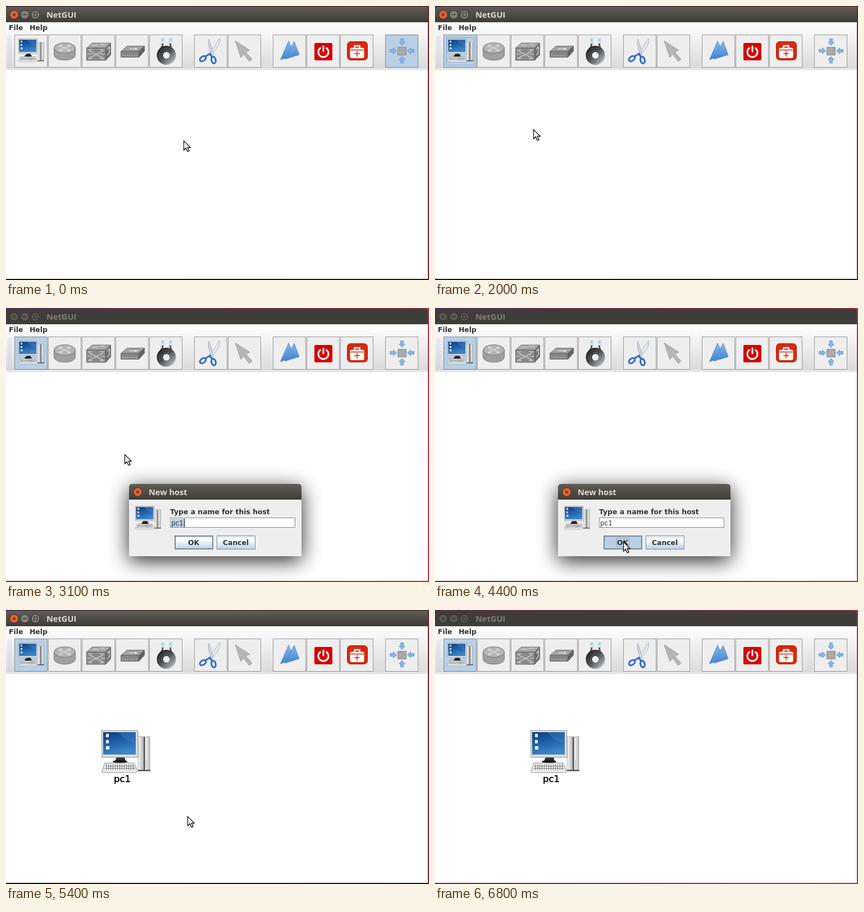
An HTML page for the animation above (7.1 s loop, 753 by 489 pixels).

```html
<!DOCTYPE html>
<html lang="en">
<head>
<meta charset="utf-8">
<title>NetGUI</title>
<style>
html, body { margin: 0; width: 100%; height: 100%; overflow: hidden; }
svg { display: block; width: 753px; height: 489px; }
text { font: bold 12.4px "DejaVu Sans", sans-serif; fill: #333; }
.title { font: bold 14.6px "Open Sans", "Noto Sans", sans-serif; fill: #dfdbd2; }
.plain { font-weight: normal; font-size: 12px; }
.label { font-weight: normal; font-size: 16.5px; fill: #000; stroke: #000; stroke-width: .5; }
.off .title { fill: #807d78; }
.off .bar { fill: #3e3d39; }
.off .ctl { fill: #5a5852; stroke: #33322e; }
.off .glyph { stroke: #33322e; }
.ctl { fill: #85827a; stroke: #33322e; }
.close { fill: #ea6237; stroke: #6d2a15; }
.glyph { fill: none; stroke: #3a3833; stroke-width: 1.3; }
</style>
</head>
<body>
<svg viewBox="0 0 753 489">
<defs>
  <linearGradient id="wall"><stop stop-color="#6d2158"/><stop offset="1" stop-color="#b62f42"/></linearGradient>
  <linearGradient id="bar" x2="0" y2="1"><stop stop-color="#5f5d54"/><stop offset="1" stop-color="#3d3c37"/></linearGradient>
  <linearGradient id="tools" x2="0" y2="1"><stop stop-color="#fff"/><stop offset="1" stop-color="#dadada"/></linearGradient>
  <linearGradient id="metal" x2="0" y2="1"><stop stop-color="#dde8f3"/><stop offset=".3" stop-color="#fff"/><stop offset="1" stop-color="#b8cfe5"/></linearGradient>
  <linearGradient id="screen" x2=".35" y2="1"><stop stop-color="#0d3d7c"/><stop offset=".5" stop-color="#1d5ea6"/><stop offset="1" stop-color="#3c86c8"/></linearGradient>
  <linearGradient id="silver"><stop stop-color="#fafafa"/><stop offset="1" stop-color="#bdbdbd"/></linearGradient>
  <linearGradient id="coil" x2="1" y2="1"><stop stop-color="#222"/><stop offset=".45" stop-color="#45484b"/><stop offset="1" stop-color="#b4b8bb"/></linearGradient>
  <linearGradient id="plane" x2="0" y2="1"><stop stop-color="#8ab9ec"/><stop offset="1" stop-color="#3f82cf"/></linearGradient>
  <pattern id="grip" width="4" height="4" patternUnits="userSpaceOnUse">
    <path d="M0 .5h1M2 2.5h1" stroke="#fff"/><path d="M1 1.5h1M3 3.5h1" stroke="#7a9cc6"/>
  </pattern>
  <pattern id="keys" width="4" height="4" patternUnits="userSpaceOnUse">
    <path d="M0 0h4M0 0v4" stroke="#777" stroke-width="1.800"/>
  </pattern>
  <filter id="blur" x="-40%" y="-80%" width="180%" height="260%"><feGaussianBlur stdDeviation="18"/></filter>
  <filter id="soft" x="-50%" y="-50%" width="200%" height="200%"><feGaussianBlur stdDeviation="1"/></filter>

  <g id="pc">
    <path d="M65 12h9v60h-9z" fill="url(#silver)" stroke="#999" stroke-width=".7"/>
    <path d="M78 12h8v59h-8z" fill="url(#silver)" stroke="#888" stroke-width=".7"/>
    <path d="M76 12v60M65 72.500h22" stroke="#3a3a3a" stroke-width="2"/>
    <path d="M80 54v14" stroke="#bbb"/>
    <path d="M27 48h14l2 8H24z" fill="#333"/>
    <ellipse cx="33" cy="56.500" rx="13" ry="2.500" fill="#111"/>
    <path d="M.5 1h64l1 48H1z" fill="#dedede" stroke="#8a8a8a"/>
    <path d="M3 4h58v40H3z" fill="url(#screen)"/>
    <path d="M30 4h31v20Q44 22 30 4z" fill="#5aa0dc" opacity=".25"/>
    <path d="M8 7h5v6H8zM8 18h5v6H8zM8 29h6v6H8z" fill="#eef4fa"/>
    <path d="M6 59h52l6 14q0 3-3 3H3q-3 0-2-3z" fill="#efefef" stroke="#888"/>
    <path d="M8 61h49l4 11H4z" fill="url(#keys)"/>
  </g>
  <path id="pull" d="M-2.500-6h5v6H5.500L0 6-5.500 0h3z" fill="#86b5e8" stroke="#5f95d0" stroke-width=".8"/>
  <g id="cross"><path class="glyph" d="M-2.500-2.500l5 5m0-5l-5 5"/></g>
</defs>

<rect width="753" height="489" fill="url(#wall)"/>
<g id="shade" fill="#000"><path d="M0 0h753v1H0z" opacity=".6"/><path d="M751 0h2v489h-2z" opacity=".35"/><path d="M0 487h751v2H0z" opacity=".7"/></g>
<path d="M0 29h751v458H0z" fill="#fff"/>

<g id="win">
  <path class="bar" d="M0 29V7q0-6 6-6h739q6 0 6 6v22z" fill="url(#bar)"/>
  <circle class="ctl close" cx="14.500" cy="15.500" r="7.500" id="shut"/>
  <circle class="ctl" cx="33.500" cy="15.500" r="7.500"/>
  <circle class="ctl" cx="52.500" cy="15.500" r="7.500"/>
  <use href="#cross" x="14.500" y="15.500"/>
  <path class="glyph" d="M30 15.500h7M49.500 12.500h6v6h-6z"/>
  <text class="title" x="72" y="21">NetGUI</text>
</g>

<path d="M0 29h751v83H0z" fill="url(#tools)"/>
<path d="M0 113.500h751" stroke="#ccc"/>
<text x="5" y="43">File</text><text x="42" y="43">Help</text>
<path d="M2 52h9v58H2z" fill="url(#grip)"/>
<g id="buttons"></g>
<rect id="ring" x="20.500" y="56.500" width="49" height="49" fill="none" stroke="#8fa9c6"/>

<use href="#pc" transform="translate(22 58) scale(.527 .55)"/>

<g stroke="#666" stroke-width=".8">
  <path d="M85.500 75v12c0 13 38 13 38 0V75z" fill="#a0a0a0"/>
  <ellipse cx="104.500" cy="75" rx="19" ry="9.500" fill="#b4b4b4"/>
</g>
<path d="M96 71l17 8m0-8l-17 8M95 73v-3h5M114 73v-3h-5M100 80h-5v-3M109 80h5v-3" fill="none" stroke="#e8e8e8" stroke-width="1.200"/>

<g stroke="#5c5c5c" stroke-width=".8">
  <path d="M143.500 75l10-9h33l-9 9z" fill="#aaa"/>
  <path d="M143.500 75h34v22h-34z" fill="#8a8a8a"/>
  <path d="M177.500 75l9-9v21l-9 10z" fill="#707070"/>
</g>
<path d="M148 80l25 13m0-13l-25 13M145 86h8m15 0h8M146 78h8m13 0h8M146 94h8m13 0h8M154 70h10m3-2h10M180 77l4-4v10l-4 5" fill="none" stroke="#e4e4e4" stroke-width="1.200"/>

<g stroke="#5c5c5c" stroke-width=".8">
  <path d="M204.500 81l11-9.500h31l-10 9.500z" fill="#a2a2a2"/>
  <path d="M204.500 81h32v10.500h-32z" fill="#868686"/>
  <path d="M236.500 81l10-9.500v9l-10 11z" fill="#626262"/>
</g>
<path d="M219 76.500h14m-3-1.500l3 1.500-3 1.500" fill="none" stroke="#f4f4f4" stroke-width="1.200"/>
<path d="M207 88.500h27" stroke="#bbb" stroke-width="1.500" stroke-dasharray="2 2"/>

<g fill="none">
  <path d="M279 66q0 6-4 11M292.500 66q0 7 3 11" stroke="#555" stroke-width="3"/>
  <circle cx="285.500" cy="88" r="11.500" stroke="url(#coil)" stroke-width="11"/>
  <circle cx="285.500" cy="88" r="9" stroke="#888" stroke-width=".7"/>
  <circle cx="285.500" cy="88" r="13" stroke="#777" stroke-width=".7"/>
  <path d="M276.500 57.500h5v9h-5zM290.500 57.500h5v9h-5z" fill="#e6f5f7" stroke="#a9cdd4" stroke-width=".8"/>
  <path d="M279 59v4M293 59v4" stroke="#46b6c8" stroke-width="1.500"/>
</g>

<path d="M380 58q3 7-5 18l-11 13-3-2z" fill="#e3e8ee" stroke="#95a0ad" stroke-width=".7"/>
<path d="M361 59q-2 9 1 17l4 13 3-2-3-13z" fill="#cfd6df" stroke="#95a0ad" stroke-width=".7"/>
<g fill="none" stroke="#2b6bd0" stroke-width="3">
  <ellipse cx="350.500" cy="94" rx="6" ry="3.800" transform="rotate(-35 350.500 94)"/>
  <ellipse cx="369.500" cy="96.500" rx="3.800" ry="6" transform="rotate(-15 369.500 96.500)"/>
  <path d="M355 90l8-5 4 7"/>
</g>

<path d="M408 62l26 17-7 3 11 13-5 4-10-13-5 6z" fill="#b5b5b5" stroke="#a2a2a2"/>

<g fill="url(#plane)" stroke="#4c88cc" stroke-width=".8"><path d="M503 62.500L488.500 96l25-10z"/><path d="M513 63l9 24-26 8z"/></g>

<rect x="549" y="66" width="32" height="31" rx="2" fill="#d50000"/>
<path d="M559.500 75a9 9 0 1 0 11 0M565 72v9" fill="none" stroke="#fff" stroke-width="3" stroke-linecap="round"/>

<rect x="607.500" y="63.500" width="36" height="33" rx="6" fill="#d9290d" stroke="#b01c06"/>
<path d="M620.500 75v-4h9v4" fill="none" stroke="#fff" stroke-width="2.500"/>
<rect x="612.500" y="74.500" width="25" height="18.500" rx="3" fill="#fff"/>
<path d="M613 78.500h24M625 80v10M620 85h10" stroke="#d9290d" stroke-width="1.500"/>

<path d="M697.500 73.500h15v14h-15z" fill="#aaa" stroke="#8b8b8b"/>
<use href="#pull" transform="translate(705 64.500)"/>
<use href="#pull" transform="translate(705 96) rotate(180)"/>
<use href="#pull" transform="translate(689.500 80) rotate(-90)"/>
<use href="#pull" transform="translate(720.500 80) rotate(90)"/>

<g id="node">
  <use href="#pc" x="170" y="214"/>
  <text class="label" x="192" y="307">pc1</text>
</g>

<g id="dialog">
  <rect x="219" y="322" width="307" height="129" filter="url(#blur)" opacity=".85"/>
  <path d="M219 342h307v101H219z" fill="#eee"/>
  <path d="M219 342v-22q0-6 6-6h295q6 0 6 6v22z" fill="url(#bar)"/>
  <circle class="ctl close" cx="234.500" cy="328.500" r="7.500"/>
  <use href="#cross" x="234.500" y="328.500"/>
  <text class="title" x="254" y="334">New host</text>
  <use href="#pc" transform="translate(230 353) scale(.527 .55)"/>
  <text x="292" y="368">Type a name for this host</text>
  <path d="M292.500 374.500h222v17h-222z" fill="#fff" stroke="#7a8a99"/>
  <g id="select"><path d="M294 376h23v15h-23z" fill="#b8cfe5"/><path d="M317.500 376v15" stroke="#000"/></g>
  <text class="plain" x="294" y="388">pc1</text>
  <rect id="ok" x="301" y="407" width="67" height="23" stroke="#7a8a99" stroke-width="2"/>
  <rect id="okRing" x="323.500" y="410.500" width="22" height="16" fill="none" stroke="#8fa9c6"/>
  <rect x="375.500" y="406.500" width="68" height="24" fill="url(#metal)" stroke="#7a8a99"/>
  <text x="324" y="423">OK</text><text x="386" y="423">Cancel</text>
</g>

<g id="cursor">
  <path d="M1.500 2v16l4-3.500 3 6.500 3-1.500-3-6h5z" opacity=".3" filter="url(#soft)"/>
  <path d="M.5.7v16.300l3.800-3.600 2.700 6.300 2.800-1.200-2.700-6.100h5z" fill="#fff" stroke="#000" stroke-width="1.200"/>
</g>
</svg>
<script>
const $ = id => document.getElementById(id);
const set = (el, name, value) => el.setAttribute(name, value);
const show = (id, on) => set($(id), 'opacity', +on);

const buttons = [15, 75, 135, 195, 255, 335, 395, 475, 535, 595, 675].map(x => {
  const r = document.createElementNS('http://www.w3.org/2000/svg', 'rect');
  for (const [k, v] of Object.entries({ x: x + .5, y: 51.5, width: 58, height: 58 })) set(r, k, v);
  return $('buttons').appendChild(r);
});
const paint = (b, fill) => {
  set(b, 'fill', fill);
  set(b, 'stroke', fill === '#b8cfe5' ? '#7a8a99' : '#999');
};

const smooth = u => u * u * (3 - 2 * u);
const out = u => 1 - (1 - u) ** 1.84;
// start, step count, from, to, easing for x and y
const moves = [
  [300, 7, [316, 240], [52, 77], smooth, smooth],
  [1600, 9, [52, 77], [211, 261], out, out],
  [3600, 7, [211, 261], [335, 417], smooth, smooth],
  [5400, 7, [335, 417], [108, 0], u => u ** 1.5, u => u ** 1.1]
];

function pointer(t) {
  const [start, n, from, to, ...ease] = moves.findLast(m => t >= m[0]) || moves[0];
  const u = Math.min(1, Math.max(0, (t - start + 100) / (100 * n)));
  return from.map((a, i) => Math.round(a + (to[i] - a) * ease[i](u)));
}

function draw(now) {
  const t = Math.floor(now % 7100 / 100) * 100;
  const [x, y] = pointer(t);
  set($('cursor'), 'transform', `translate(${x} ${y})`);
  show('cursor', t < 6100);

  const hover = x >= 15 && x < 75 && y >= 51 && y < 111;
  buttons.forEach(b => paint(b, '#eee'));
  paint(buttons[0], t >= 1200 ? '#b8cfe5' : hover ? 'url(#metal)' : '#eee');
  if (t < 1400) paint(buttons[10], '#b8cfe5');
  show('ring', t >= 1200 && t < 2800);

  const fade = t === 3000 || t === 4600 ? .5 : +(t > 3000 && t < 4600);
  const off = t >= 3000 && t < 4600 || t >= 6800;
  set($('win'), 'class', off ? 'off' : '');
  set($('shut'), 'class', off ? 'ctl' : 'ctl close');
  show('shade', t >= 6800 ? 0 : 1 - fade);
  show('dialog', fade);
  show('node', t >= 4600);

  const pressed = t >= 4400;
  show('select', !pressed);
  show('okRing', pressed);
  set($('ok'), 'fill', pressed ? '#b8cfe5' : 'url(#metal)');
}

const begin = performance.now();
(function loop() {
  draw(performance.now() - begin);
  requestAnimationFrame(loop);
})();
</script>
</body>
</html>
```
